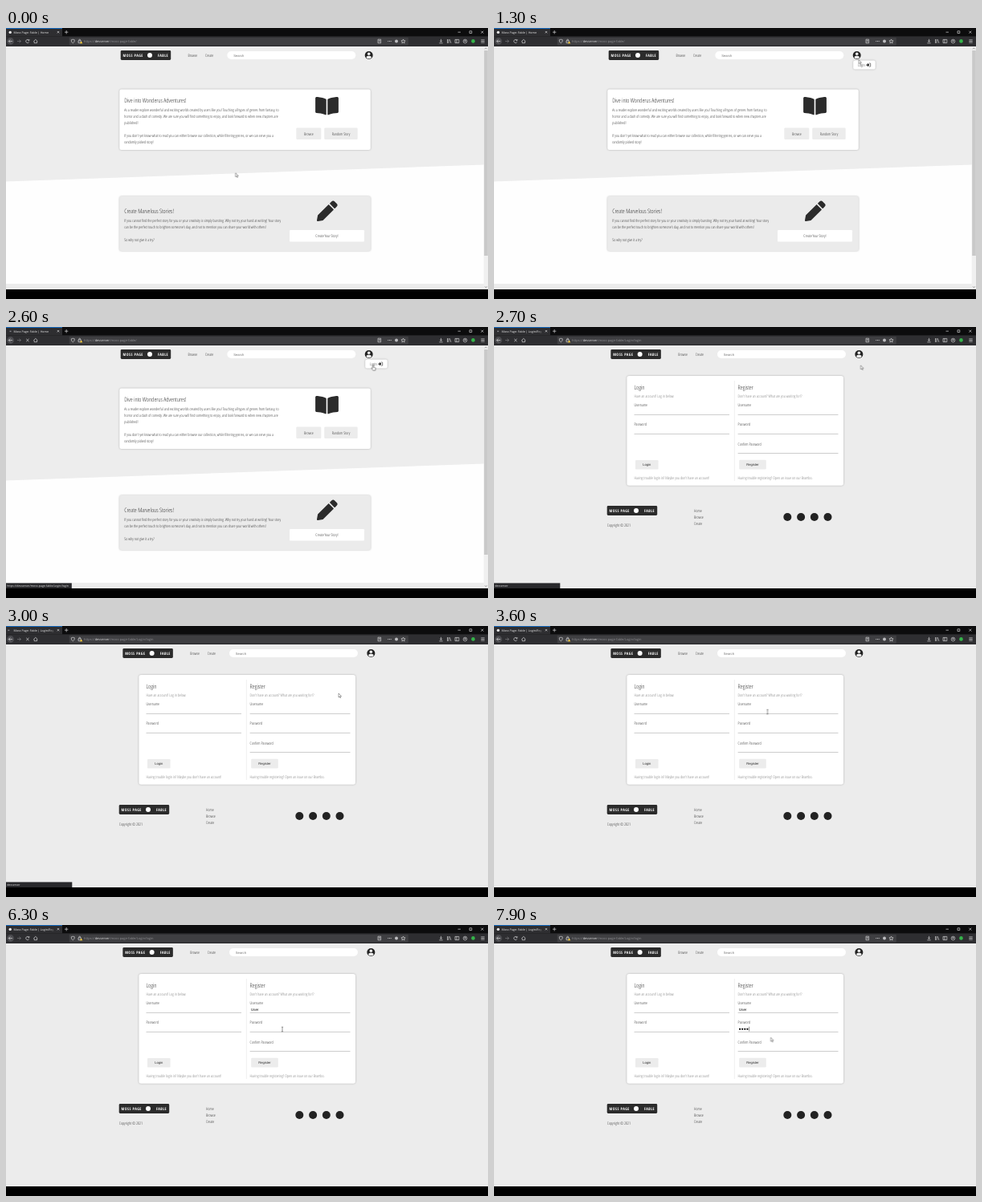
An HTML page for the animation above (8 s loop, 600 by 338 pixels).

```html
<!DOCTYPE html>
<html lang="en">
<head>
<meta charset="utf-8">
<title>Moss Page: Fable</title>
<style>
html, body { margin: 0; height: 100%; overflow: hidden; background: #000; }
svg { display: block; width: 600px; height: 338px; }
text { font-family: "Open Sans", "Noto Sans", sans-serif; text-rendering: geometricPrecision; white-space: pre; }
.web text { font: 300 5px "Open Sans Condensed Light", "Open Sans", sans-serif; font-stretch: 75%; fill: #2c2c2c; }
.web.plain text { font-family: "Open Sans", sans-serif; font-stretch: normal; }
.web .h { font-size: 7.5px; }
.web .dim { fill: #777; }
.web text.mark { font: 700 4.8px "Open Sans Condensed", "Open Sans", sans-serif; font-stretch: 75%; letter-spacing: .45px; fill: #fff; }
.web text.a { font: 4.17px "Liberation Sans", Arial, sans-serif; }
.web text.in { font-size: 4.4px; fill: #000; }
.web text.status { font: 3.55px "Open Sans", sans-serif; fill: #e4e4e4; }
.mid { text-anchor: middle; }
.card { filter: drop-shadow(0 .7px 1.3px #0004); }
.ink { fill: #2b2b2b; }
.rule { stroke: #999; stroke-width: .5; }
.line { fill: none; stroke: #d4d4d6; stroke-width: .7; }
.tab { font-size: 3.65px; fill: #f0f0f0; }
.url { font-size: 4px; fill: #8e8e92; }
.url .host { fill: #dcdcde; }

/* All tracks share one 8 s loop; 1.25% is 100 ms. */
.t { animation: 8s step-end infinite; }
.home { animation-name: home; }
.login { animation-name: login; }
.menu { animation-name: menu; }
.link { animation-name: link; }
.load { animation-name: load; }
.idle { animation-name: idle; }
.dot { animation: dot .8s ease-in-out infinite alternate; }
.pointer { animation-name: move; }
.arrow { animation-name: arrow; }
.hand { animation-name: hand; }
.beam { animation-name: beam; }
.caret { animation-name: caret; }
.u1 { animation-name: u1; } .u2 { animation-name: u2; } .u3 { animation-name: u3; } .u4 { animation-name: u4; }
.p1 { animation-name: p1; } .p2 { animation-name: p2; } .p3 { animation-name: p3; } .p4 { animation-name: p4; }

@keyframes home { 0% { opacity: 1 } 33.75%, to { opacity: 0 } }
@keyframes login { 0% { opacity: 0 } 33.75%, to { opacity: 1 } }
@keyframes menu { 0% { opacity: 0 } 8.75%, to { opacity: 1 } }
@keyframes link { 0% { opacity: 0 } 18.75%, to { opacity: 1 } }
@keyframes load { 0% { opacity: 0 } 32.5% { opacity: 1 } 40%, to { opacity: 0 } }
@keyframes idle { 0% { opacity: 1 } 32.5% { opacity: 0 } 40%, to { opacity: 1 } }
@keyframes dot { from { transform: none } to { transform: translate(3px) } }
@keyframes u1 { 0% { visibility: hidden } 47.5%, to { visibility: visible } }
@keyframes u2 { 0% { visibility: hidden } 50%, to { visibility: visible } }
@keyframes u3 { 0% { visibility: hidden } 52.5%, to { visibility: visible } }
@keyframes u4 { 0% { visibility: hidden } 53.75%, to { visibility: visible } }
@keyframes p1 { 0% { opacity: 0 } 85%, to { opacity: 1 } }
@keyframes p2 { 0% { opacity: 0 } 86.25%, to { opacity: 1 } }
@keyframes p3 { 0% { opacity: 0 } 90%, to { opacity: 1 } }
@keyframes p4 { 0% { opacity: 0 } 92.5%, to { opacity: 1 } }
@keyframes caret {
  0% { opacity: 0; transform: translate(304.6px, 102.6px) }
  47.5% { opacity: 1; transform: translate(308.3px, 102.6px) }
  50% { opacity: 1; transform: translate(310.5px, 102.6px) }
  52.5% { opacity: 1; transform: translate(313px, 102.6px) }
  53.75% { opacity: 1; transform: translate(314.6px, 102.6px) }
  65% { opacity: 0; transform: translate(304.6px, 126.8px) }
  70% { opacity: 1; transform: translate(304.6px, 126.8px) }
  78.75% { opacity: 0; transform: translate(304.6px, 126.8px) }
  85% { opacity: 1; transform: translate(307.8px, 126.8px) }
  86.25% { opacity: 1; transform: translate(310.9px, 126.8px) }
  90% { opacity: 1; transform: translate(314px, 126.8px) }
  92.5%, to { opacity: 1; transform: translate(317.1px, 126.8px) }
}
@keyframes arrow {
  0% { opacity: 1 } 18.75% { opacity: 0 } 33.75% { opacity: 1 } 41.25% { opacity: 0 }
  60% { opacity: 1 } 63.75% { opacity: 0 } 98.75%, to { opacity: 1 }
}
@keyframes hand { 0% { opacity: 0 } 18.75% { opacity: 1 } 33.75%, to { opacity: 0 } }
@keyframes beam {
  0% { opacity: 0 } 41.25% { opacity: 1 } 60% { opacity: 0 } 63.75% { opacity: 1 } 98.75%, to { opacity: 0 }
}
@keyframes move {
  0% { transform: translate(285.7px, 180.7px) }
  1.25% { transform: translate(288px, 188px) }
  2.5% { transform: translate(308px, 180px) }
  3.75% { transform: translate(348px, 146px) }
  5% { transform: translate(394px, 98px) }
  6.25% { transform: translate(430px, 58px) }
  7.5% { transform: translate(446px, 40px) }
  8.75% { transform: translate(450px, 35px) }
  10% { transform: translate(451px, 34px) }
  16.25% { transform: translate(454px, 39.5px) }
  17.5% { transform: translate(455px, 43px) }
  18.75% { transform: translate(456px, 46px) }
  20% { transform: translate(456.4px, 47px) }
  21.25% { transform: translate(456.5px, 47.8px) }
  35% { transform: translate(454px, 52px) }
  36.25% { transform: translate(441px, 66px) }
  37.5% { transform: translate(414px, 84px) }
  38.75% { transform: translate(383px, 97px) }
  40% { transform: translate(359px, 104px) }
  41.25% { transform: translate(347px, 107px) }
  42.5% { transform: translate(342px, 107px) }
  45% { transform: translate(340.5px, 107px) }
  58.75% { transform: translate(341px, 110px) }
  60% { transform: translate(343px, 116px) }
  61.25% { transform: translate(344px, 121px) }
  62.5% { transform: translate(345px, 125px) }
  63.75% { transform: translate(344.5px, 129px) }
  65% { transform: translate(344px, 130px) }
  96.25% { transform: translate(344px, 134px) }
  98.75%, to { transform: translate(344.5px, 140.3px) }
}
</style>
</head>
<body>
<svg viewBox="0 0 600 338">
  <defs>
    <linearGradient id="fade" gradientUnits="userSpaceOnUse" x1="54" x2="61"><stop stop-color="#2e2e31" stop-opacity="0"/><stop offset="1" stop-color="#2e2e31"/></linearGradient>
    <path id="leaf" d="M264.7 87.6C197.5 46.5 88.6 35.2 33.8 32 15.4 31 0 45 0 62.8V400.6c0 16.2 13.1 29.8 30 30.7 49.5 2.6 149.6 12.1 218.8 47 10.6 5.3 23.2-2 23.2-13.5V100.6c0-5.3-2.6-10.1-7.3-13z"/>
    <g id="logo" class="web">
      <rect class="ink" x="142.7" y="28" width="62.5" height="12" rx="1.4"/>
      <text class="mark" x="145.5" y="35.9">MOSS PAGE</text>
      <circle cx="179" cy="34" r="3" fill="#fff"/>
      <text class="mark" x="189" y="35.9">FABLE</text>
    </g>
    <g id="nav" class="web">
      <use href="#logo"/>
      <text x="226.6" y="35.9">Browse</text>
      <text x="248" y="35.9">Create</text>
      <rect x="275.3" y="29" width="160" height="10" rx="5" fill="#fff"/>
      <text class="a dim" x="283.2" y="35.6">Search</text>
      <circle cx="451.7" cy="34" r="5" fill="#222"/>
      <circle cx="451.7" cy="32.3" r="1.8" fill="#f2f2f2"/>
      <path d="M448.4 36.7c.3-1.6 1.5-2 3.3-2s3 .4 3.3 2c-1.8 2-4.8 2-6.6 0z" fill="#f2f2f2"/>
    </g>
  </defs>

  <g class="t home web">
    <rect y="23" width="600" height="303" fill="#fefefe"/>
    <path d="M0 23H595V170.5L0 191.5z" fill="#ededed"/>
    <rect y="319" width="595" height="7" fill="#ececec"/>
    <use href="#nav"/>

    <rect class="card" x="141.3" y="76.5" width="312.5" height="75.5" rx="2.5" fill="#fff"/>
    <text class="h" x="147.3" y="93.3">Dive into Wonderus Adventures!</text>
    <text id="probe" x="147.3" y="103.8">As a reader explore wonderful and exciting worlds created by users like you! Touching all types of genres from fantasy, to</text>
    <text x="147.3" y="111.8">horror and a dash of comedy. We are sure you will find something to enjoy, and look forward to when new chapters are</text>
    <text x="147.3" y="119.8">published!</text>
    <text x="147.3" y="135.8">If you don't yet know what to read you can either browse our collection, while filtering genres, or we can serve you a</text>
    <text x="147.3" y="143.8">randomly picked story!</text>
    <g class="ink" transform="translate(385.1 84.4) scale(.05)">
      <use href="#leaf"/><use href="#leaf" transform="matrix(-1 0 0 1 576 0)"/>
    </g>
    <rect x="361.3" y="124.5" width="31" height="14.5" rx="1.2" fill="#ececec"/>
    <text class="mid" x="376.8" y="133.6">Browse</text>
    <rect x="396.2" y="124.5" width="41.5" height="14.5" rx="1.2" fill="#ececec"/>
    <text class="mid" x="417" y="133.6">Random Story</text>

    <rect class="card" x="141.3" y="210" width="312.5" height="68" rx="2.5" fill="#ebebeb"/>
    <text class="h" x="147.3" y="231">Create Marvelous Stories!</text>
    <text x="147.3" y="241.6">If you cannot find the perfect story for you or your creativity is simply bursting. Why not try your hand at writing! Your story</text>
    <text x="147.3" y="249.6">can be the perfect touch to brighten someone's day, and not to mention you can share your world with others!</text>
    <text x="147.3" y="265.6">So why not give it a try?</text>
    <path class="ink" transform="translate(387 215.5) scale(.05)" d="M498 142l-46 46c-5 5-12 5-17 0L324 77c-5-5-5-12 0-17l46-46c19-19 49-19 68 0l60 60c19 19 19 49 0 68zM284 100L22 362 0 484c-3 16 11 31 28 28l122-22 262-262c5-5 5-12 0-17L301 100c-5-5-12-5-17 0z"/>
    <rect x="353" y="252" width="93" height="14.5" rx="1.2" fill="#fff"/>
    <text class="mid" x="399.5" y="261.2">Create Your Story!</text>

    <g class="t menu">
      <rect class="card" x="447.2" y="40.6" width="27.5" height="10.8" rx="2" fill="#fff"/>
      <text x="453" y="47.8">Login</text>
      <path d="M463.4 45.4h1.6v-1.6l2.4 2.3-2.4 2.3v-1.6h-1.6z" fill="#222"/>
      <path d="M466.9 44h1.2q.6 0 .6.6v3q0 .6-.6.6h-1.2" fill="none" stroke="#222" stroke-width=".6"/>
    </g>

    <rect x="594.7" y="23" width="5.3" height="303" fill="#f0f0f0"/>
    <rect x="595.2" y="28" width="4.6" height="256" fill="#c9c9c9"/>
    <path d="M596 26.3l1.4-1.5 1.4 1.5M596 322.3l1.4 1.5 1.4-1.5" fill="none" stroke="#666" stroke-width=".6"/>
    <g class="t link">
      <rect y="319.4" width="81.8" height="6.6" fill="#29292c"/>
      <text class="status" x="1.2" y="324">https://devserver/moss-page-fable/Login/login</text>
    </g>
  </g>

  <g class="t login web">
    <rect y="23" width="600" height="303" fill="#ececec"/>
    <use href="#nav" x="2.65"/>
    <rect class="card" x="165.4" y="61" width="269.6" height="136.8" rx="2.8" fill="#fff"/>
    <path d="M299.3 67V192" stroke="#ddd" stroke-width=".5"/>

    <text class="h" x="174.5" y="77.8">Login</text>
    <text class="dim" x="174.5" y="88.2">Have an account? Log in below.</text>
    <text x="174.5" y="99.2">Username</text>
    <text x="174.5" y="123.3">Password</text>
    <path class="rule" d="M174.5 109.4H293M174.5 133.4H293"/>
    <rect x="176" y="166" width="28.6" height="11.6" rx="1.2" fill="#ececec"/>
    <text class="a mid" x="190.3" y="173.4">Login</text>
    <text class="dim" x="174.5" y="189.6">Having trouble login in? Maybe you don't have an account!</text>

    <text class="h" x="303.6" y="77.8">Register</text>
    <text class="dim" x="303.6" y="88.2">Don't have an account? What are you waiting for!?</text>
    <text x="303.6" y="99.2">Username</text>
    <text x="303.6" y="123.3">Password</text>
    <text x="303.6" y="147.6">Confirm Password</text>
    <path class="rule" d="M303.6 109.4H428.5M303.6 133.4H428.5M303.6 157.5H428.5"/>
    <rect x="305.2" y="165.8" width="33.6" height="11.6" rx="1.2" fill="#ececec"/>
    <text class="a mid" x="322" y="173.2">Register</text>
    <text class="dim" x="303.6" y="189.6">Having trouble registering? Open an issue on our Brambo.</text>

    <text class="a in" x="305" y="107.1"><tspan class="t u1">U</tspan><tspan class="t u2">s</tspan><tspan class="t u3">e</tspan><tspan class="t u4">r</tspan></text>
    <g>
      <circle class="t p1" cx="306.1" cy="129.8" r="1.1"/>
      <circle class="t p2" cx="309.2" cy="129.8" r="1.1"/>
      <circle class="t p3" cx="312.3" cy="129.8" r="1.1"/>
      <circle class="t p4" cx="315.4" cy="129.8" r="1.1"/>
    </g>
    <rect class="t caret" width=".45" height="5.6"/>

    <use href="#logo" x="-2" y="195"/>
    <text x="140.8" y="248.8">Copyright © 2021</text>
    <text x="249" y="230.8">Home</text>
    <text x="249" y="238.8">Browse</text>
    <text x="249" y="246.8">Create</text>
    <g fill="#222">
      <circle cx="365.3" cy="237" r="5"/><circle cx="382.1" cy="237" r="5"/>
      <circle cx="398.8" cy="237" r="5"/><circle cx="415.5" cy="237" r="5"/>
    </g>
    <g class="t load">
      <rect y="319.4" width="82.3" height="6.6" fill="#29292c"/>
      <text class="status" x="1.2" y="324">devserver</text>
    </g>
  </g>

  <!-- browser frame -->
  <rect width="600" height="10.4" fill="#0c0c0d"/>
  <rect y="10.3" width="600" height="12.7" fill="#2e2e31"/>
  <rect width="70" height="10.4" fill="#2e2e31"/>
  <rect width="70" height=".7" fill="#0a84ff"/>
  <text class="tab t home" x="9.6" y="6.7">Moss Page: Fable | Home</text>
  <text class="tab t login" x="9.6" y="6.7">Moss Page: Fable | Login/Reg</text>
  <rect x="54" y="1" width="16" height="9" fill="url(#fade)"/>
  <circle class="t idle" cx="5.2" cy="5.4" r="1.7" fill="#f0f0f0"/>
  <g class="t load"><circle class="dot" cx="2.9" cy="5.3" r=".9" fill="#9a9aa0"/></g>
  <path class="line" d="M63.8 4l2.4 2.4M66.2 4l-2.4 2.4M73 5.2h4.4M75.2 3v4.4"/>
  <path class="line" d="M562.5 5.2h3.4M577 3.8h2.8v2.8h-2.8zM591.3 3.7l3 3M594.3 3.7l-3 3"/>

  <circle cx="5.6" cy="16.5" r="4.4" fill="#4c4c50"/>
  <path class="line" d="M8 16.5H3.4M5.3 14.5l-2 2 2 2"/>
  <path class="line" d="M14 16.5h4.4M16.5 14.5l2 2-2 2" style="stroke:#77777b"/>
  <path class="line t idle" d="M28.6 15.3a2.1 2.1 0 1 0 .1 2.2M28.9 14v1.7h-1.7"/>
  <path class="line t load" d="M25.2 14.8l3.4 3.4M28.6 14.8l-3.4 3.4"/>
  <path class="line" d="M34.3 16.7l2.5-2.4 2.5 2.4M35.1 16.4v2.3h3.4v-2.3"/>
  <rect x="78.8" y="11.8" width="422" height="9.6" rx=".8" fill="#3f3f42"/>
  <path class="line" d="M81.3 14.8l2-.6 2 .6c0 2-.5 3.2-2 4-1.5-.8-2-2-2-4z"/>
  <path class="line" d="M90 16h3.4v2.6H90zM90.7 16v-.8a1 1 0 0 1 2 0v.8"/>
  <path d="M93.6 16.4l1.7 2.8h-3.4z" fill="#ffd43a"/>
  <text class="url t home" x="97" y="18"><tspan>https://</tspan><tspan class="host">devserver</tspan>/moss-page-fable/</text>
  <text class="url t login" x="97" y="18"><tspan>https://</tspan><tspan class="host">devserver</tspan>/moss-page-fable/Login/login</text>
  <path class="line" d="M463 14.2h3.6v4.6H463zM463.9 15.6h1.8M463.9 16.9h1.8"/>
  <g fill="#d4d4d6"><circle cx="475.8" cy="16.5" r=".55"/><circle cx="477.5" cy="16.5" r=".55"/><circle cx="479.2" cy="16.5" r=".55"/></g>
  <circle cx="486" cy="16.5" r="2" fill="#bdbdc0"/>
  <path class="line" d="M494.5 14l.7 1.7 1.9.2-1.4 1.2.4 1.9-1.6-1-1.6 1 .4-1.9-1.4-1.2 1.9-.2z"/>
  <path class="line" d="M541.5 13.8v3.4M540 15.8l1.5 1.5 1.5-1.5M539.3 18.8h4.4"/>
  <path class="line" d="M549.5 14v5M551 14v5M552.3 14.2l1.6 4.7M559 14.4h4.8v4.2H559zM561 14.4v4.2"/>
  <circle class="line" cx="571.5" cy="16.5" r="2.3"/><circle cx="571.5" cy="16.2" r=".9" fill="#d4d4d6"/>
  <circle cx="581.5" cy="16.4" r="2.3" fill="#35b44a"/>
  <path class="line" d="M591.3 14.8h4.4M591.3 16.5h4.4M591.3 18.2h4.4"/>

  <rect y="326" width="600" height="12" fill="#000"/>

  <g class="t pointer">
    <path class="t arrow" d="M0 0V5L1.2 3.9 2 5.7 2.7 5.4 2 3.6H3.5z" fill="#fff" stroke="#222" stroke-width=".4"/>
    <path class="t hand" d="M-.2.1c.6-.5 1.1 0 1.1.5v1.8l2 .4c.6.1.9.5.8 1.1l-.5 2.4H.4L-1.4 3.8c-.3-.7.3-1 .8-.6l.4.4z" fill="#fff" stroke="#111" stroke-width=".45"/>
    <path class="t beam" d="M-1.1-2.8h.8l.3.3.3-.3h.8M0-2.5V2.5M-1.1 2.8h.8l.3-.3.3.3h.8" fill="none" stroke="#222" stroke-width=".5"/>
  </g>
</svg>
<script>
// Where no light condensed cut is installed, narrow the light face by one common ratio.
const ratio = .7;
const probe = document.getElementById('probe');
const webs = document.querySelectorAll('.web');
const setPlain = on => webs.forEach(el => el.classList.toggle('plain', on));

const narrow = probe.getComputedTextLength();
setPlain(true);
const wide = probe.getComputedTextLength();
if (narrow < wide * .78) {
  setPlain(false);
} else {
  for (const el of document.querySelectorAll('.web text:not(.a, .mark, .status)')) {
    const x = el.getAttribute('x');
    el.setAttribute('transform', `translate(${x * (1 - ratio)} 0) scale(${ratio} 1)`);
  }
}
</script>
</body>
</html>
```
